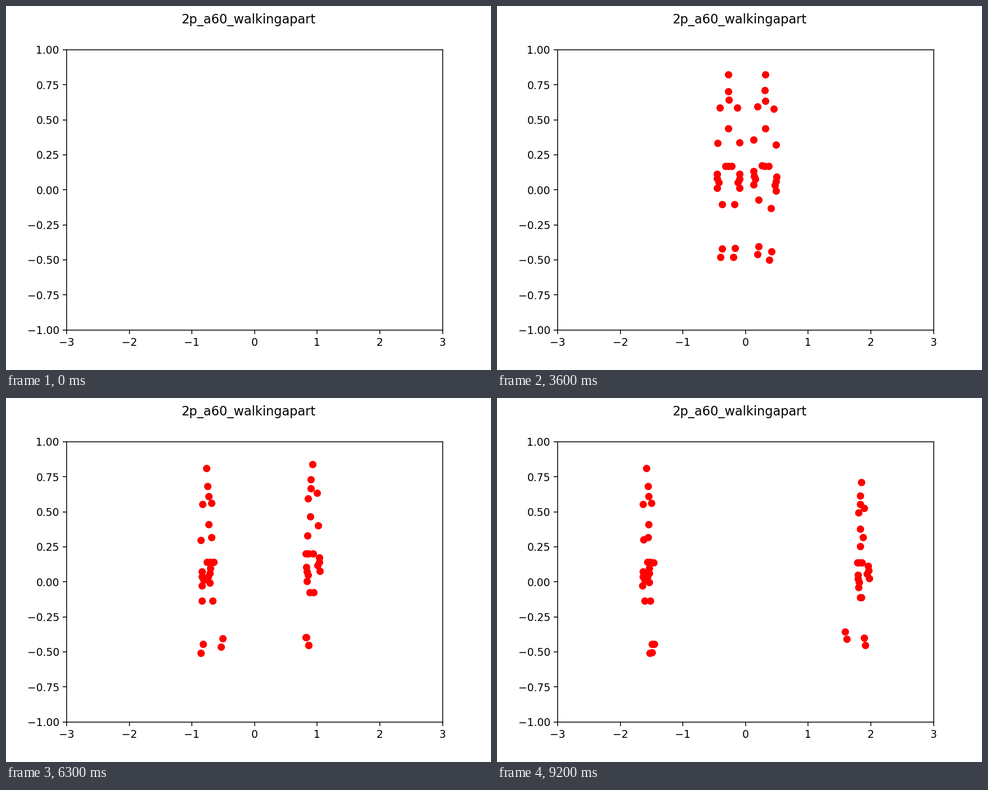
Recreate the animation shown at these times as a matplotlib script. Size 864 by 648 pixels, loop 9.3 s.

```python
import numpy as np
import matplotlib.pyplot as plt
from matplotlib.animation import FuncAnimation

W, H, DPI = 864, 648, 135
FRAMES, STEP = 93, 100


def smooth(t, start, end):
    u = np.clip((t - start) / (end - start), 0, 1)
    return u * u * (3 - 2 * u)


def mix(a, b, u):
    return a + (b - a) * u


class Walker:
    """A 25-joint body that stands facing us, then turns and walks off.

    All lengths are stage pixels, y runs downward.
    """

    def __init__(self, x, speed, start, ramp, pace, phase, shoulder, arm,
                 tilt, drift, seed, sags=False):
        self.x, self.speed, self.start, self.ramp = x, speed, start, ramp
        self.pace, self.phase = pace, phase
        self.shoulder, self.arm = shoulder, arm  # half widths at rest
        self.tilt = tilt                         # side lean, standing and walking
        self.drift = drift                       # sink or rise as the body turns
        self.sags = sags
        self.facing = np.sign(speed)
        rng = np.random.default_rng(seed)
        self.sway = rng.uniform(-1, 1, (25, 2))
        self.beat = rng.uniform(0, 2 * np.pi, (25, 1))

    def root(self, t):
        """Stand still, then speed up softly to a steady walk."""
        run = self.ramp * np.log1p(np.exp((t - self.start) / self.ramp))
        return self.x + self.speed * run

    def trunk(self, walk):
        ahead = 3 * self.facing * walk
        head, chest, pelvis = map(np.array, (
            (ahead, 122 - self.drift * walk / 2), (0, 168), (-ahead, 285)))
        hip = np.array((6, 0))
        return [head, chest, pelvis, mix(chest, head, 0.37),
                mix(chest, pelvis, 0.425), pelvis - hip, pelvis + hip]

    def limb(self, side, t, walk, stride):
        """Shoulder to fingertip and knee to foot on one side of the body."""
        ahead = self.facing * walk
        lean = side * mix(*self.tilt, walk)
        wide = np.interp(t, [2.1, 3.6, 5.5, 8], [self.arm, 20, 12, 4])
        shoulder = np.interp(t, [2.1, 3.6, 5.8], [self.shoulder, 15, 8])
        wrist = np.array((side * (wide + walk * (2 - 5 * stride)) + 4 * ahead,
                          299 + lean))
        tip = wrist + (ahead, 25)
        arm = [(side * shoulder + 3 * ahead, 181 + lean / 2),
               (side * wide + 4 * ahead, 243 + lean),
               wrist, mix(wrist, tip, 0.36), tip,
               mix(wrist, tip, 0.6) - (3 * side, 0)]

        stance = mix(6, 11, smooth(t, 2.1, 3.6)) * (1 - walk)
        rest = side * self.tilt[0] * (1 - walk)
        swing = side * stride * walk
        lift = 12 * max(0, -swing * self.facing)
        ankle = np.array((side * stance + 20 * swing - 8 * ahead,
                          432 + rest - lift))
        turn = 4 * self.facing * walk - 3 * (1 - walk)
        leg = [(side * (stance + 4 * walk) + 6 * swing + 2 * ahead,
                353 + 1.5 * rest), ankle, ankle + (turn, 15)]
        return arm + leg

    def joints(self, t):
        walk = smooth(t, 3.6, 6)
        stride = np.sin(self.pace * t + self.phase)
        p = np.array(self.trunk(walk)
                     + self.limb(-1, t, walk, stride)
                     + self.limb(1, t, walk, stride))
        p[:, 1] += self.drift * walk
        if self.sags:
            sag = smooth(t, 8.5, 9.2)
            p[:, 1] += 0.1 * sag * np.maximum(0, 437 - p[:, 1])
            p[:18, 0] *= 1 - 0.4 * sag
        p[:, 0] += self.root(t)
        return p + self.sway * np.sin(2 * t + self.beat)


walkers = [
    Walker(x=417, speed=-32, start=4.6, ramp=0.7, pace=4, phase=np.pi / 2 - 32,
           shoulder=18, arm=21, tilt=(0, -3), drift=7, seed=4),
    Walker(x=476, speed=36, start=4.45, ramp=0.4, pace=5.9, phase=-5.9 * 6.3,
           shoulder=10, arm=13, tilt=(5, -9), drift=-7, seed=9, sags=True),
]

fig, ax = plt.subplots(figsize=(W / DPI, H / DPI), dpi=DPI)
fig.suptitle("2p_a60_walkingapart")
ax.set_xlim(-3, 3)
ax.set_ylim(-1, 1)
dots = ax.scatter([], [], color="red")


def to_data(px):
    box = ax.get_position()
    x = (px[:, 0] / W - box.x0) / box.width * 6 - 3
    y = (1 - px[:, 1] / H - box.y0) / box.height * 2 - 1
    return np.column_stack([x, y])


def update(frame):
    if frame == 0:
        dots.set_offsets(np.empty((0, 2)))
    else:
        t = frame * STEP / 1000
        dots.set_offsets(to_data(np.vstack([w.joints(t) for w in walkers])))
    return dots,


anim = FuncAnimation(fig, update, frames=FRAMES, interval=STEP,
                     repeat=True, repeat_delay=0)
plt.show()
```
